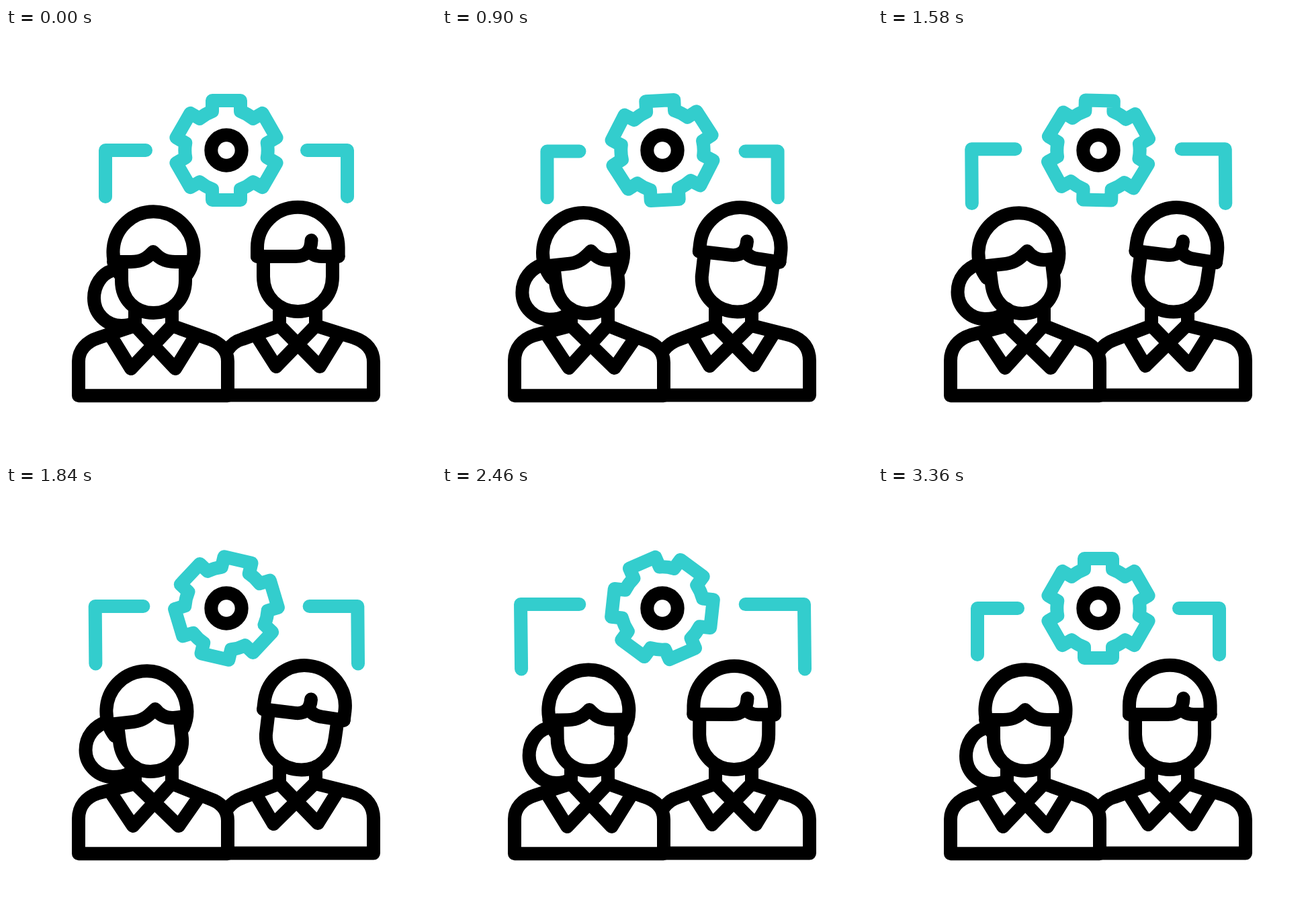
An HTML page that plays this animation: 640x640 px, repeating every 3.6 s.

```html
<!DOCTYPE html>
<html lang="en">
<head>
<meta charset="utf-8">
<title>Team setup</title>
<style>
  html, body { margin: 0; width: 100%; height: 100%; overflow: hidden; background: #fff; }
  svg { display: block; width: 100vw; height: 100vh; }
  path, circle { fill: none; stroke: #000; stroke-width: 20; stroke-linecap: round; stroke-linejoin: round; }
  .teal { stroke: #33cdcd; }
</style>
</head>
<body>
<svg id="stage" viewBox="0 0 640 640">
  <path id="brackets" class="teal"/>
  <path id="gear" class="teal"/>
  <circle cx="328" cy="182" r="22.7"/>
</svg>
<script>
const LOOP = 3600;
const svg = document.getElementById('stage');
const gear = document.getElementById('gear');
const brackets = document.getElementById('brackets');

const linear = u => u;
const smooth = u => u * u * (3 - 2 * u);
const sine = u => (1 - Math.cos(u * Math.PI)) / 2;
const soft = u => (u + smooth(u)) / 2;
const lerp = (a, b, k) => a + (b - a) * k;

// Each step: [time, value, easing towards this value]
function track(steps, t) {
  if (t <= steps[0][0]) return steps[0][1];
  for (let i = 1; i < steps.length; i++) {
    const [t1, b, ease] = steps[i];
    if (t < t1) {
      const [t0, a] = steps[i - 1];
      const k = ease((t - t0) / (t1 - t0));
      return Array.isArray(a) ? a.map((v, j) => lerp(v, b[j], k)) : lerp(a, b, k);
    }
  }
  return steps[steps.length - 1][1];
}

// Blend two path strings that share one structure
function blend(from, to, k) {
  const ends = to.match(/[\d.]+/g);
  let i = 0;
  return from.replace(/[\d.]+/g, n => +lerp(+n, +ends[i++], k).toFixed(2));
}

const spin = [[60, 0], [3160, -368, sine], [3360, -360, smooth]];
const leftTilt = [[80, 0], [1060, 1, smooth], [1840, 1, linear], [2620, 0, smooth]];
const rightTilt = [[80, 0], [1060, 1, smooth], [1750, 1, linear], [2560, 0, smooth]];

// Tip x, corner x, corner y, bottom y, sideways lean of the foot
const frame = [
  [80, [208, 148, 182, 251, 0]],
  [680, [204.5, 162, 184.5, 249.5, 0], smooth],
  [2700, [204.3, 111, 175, 275.5, 1.2], linear],
  [3340, [208, 148, 182, 251, 0], soft]
];

// [tilt track, upright pose, tilted pose]
const parts = [
  // left: body, ponytail, hair, fringe, face, collar
  [leftTilt,
    'M192 418L192 443L138 461C119 467 108 480 108 496L108 547.2L330 547.2L330 496C330 480 319 468 300 462L247 443L247 418',
    'M192 418L192 443L138 457C119 463 108 477 108 495L108 547.2L330 547.2L330 498C330 482 320 471 302 465L247 443L247 418'],
  [leftTilt,
    'M158 361C142 366 131 383 131 402C131 425 149 443 172 443C180 443 187 441 192 438',
    'M150 351C132 357 118.5 372 118.5 393C118.5 415 137 433 159 433C168 433 178 431 184 427'],
  [leftTilt,
    'M172 370A60 60 0 1 1 267 370',
    'M162 372A60 60 0 1 1 264 360'],
  [leftTilt,
    'M160 348L186 348C205 348 212 340 219 333C226 340 233 348 252 348L278 348',
    'M154 355L190 351C206 349 214 340 222 332C229 341 238 346 250 345L266 343'],
  [leftTilt,
    'M172 348L172 376C172 404 192 424 219.5 424C247 424 267 404 267 376L267 348',
    'M166 356L169 380C172 408 191 425 215 425C243 425 264 402 262 376L259 350'],
  [leftTilt,
    'M157 460L186 507L247 443M192 443L252 507L281 460',
    'M157 458L189 506L248 441M192 443L257 506L287 463'],
  // right: body, hair, fringe, lock, face, collar
  [rightTilt,
    'M407 418L407 443L352 463Q338 467 330 479M461 418L461 443L518 461C538 468 547 481 547 497L547 546.6L330 546.6',
    'M407 418L407 443L352 464Q338 469 330 480M461 418L461 443L518 457C538 463 547 477 547 495L547 546.6L330 546.6'],
  [rightTilt,
    'M374 340L374 327A60.3 60.3 0 0 1 494.6 327L494.6 340',
    'M383.5 332L385 320A60.3 60.3 0 0 1 504.8 335L503 349'],
  [rightTilt,
    'M374 340L431 340C446 340 454 332 454.5 316',
    'M383.5 332L432 338C446 339 453 331 454 317.5'],
  [rightTilt,
    'M452 331C455 337 461 340 470 340L494.6 340',
    'M451 332C455 339 462 343 472 344L503 349'],
  [rightTilt,
    'M383 340L383 370C383 400 406 422 434.5 422C463 422 486 400 486 370L486 340',
    'M391 337L387 370C386 401 411 422.5 440 422.5C467 422.5 487 403 490 375L494 348'],
  [rightTilt,
    'M374 460L402 504L461 443M407 443L467 504L494 460',
    'M372 459L398 503L461 441M407 443L464 502L492 457']
].map(([tilt, from, to]) => {
  const el = svg.appendChild(document.createElementNS(svg.namespaceURI, 'path'));
  return { el, tilt, from, to };
});

function gearPath() {
  const tooth = [[-21, -58], [-21, -74], [21, -74], [21, -58]];
  let d = '';
  for (let i = 0; i < 6; i++) {
    const c = Math.cos(i * Math.PI / 3), s = Math.sin(i * Math.PI / 3);
    tooth.forEach(([x, y], j) => {
      const cmd = j ? 'L' : i ? 'A62 62 0 0 1 ' : 'M';
      d += `${cmd}${(328 + x * c - y * s).toFixed(2)} ${(182 + x * s + y * c).toFixed(2)}`;
    });
  }
  return d + 'A62 62 0 0 1 307 124Z';
}
gear.setAttribute('d', gearPath());

function draw(t) {
  gear.setAttribute('transform', `rotate(${track(spin, t)} 328 182)`);
  const [tip, x, y, low, lean] = track(frame, t);
  brackets.setAttribute('d',
    `M${tip} ${y}H${x}L${x + lean} ${low}M${656 - tip} ${y}H${656 - x}L${656 - x + lean} ${low}`);
  for (const { el, tilt, from, to } of parts) {
    el.setAttribute('d', blend(from, to, track(tilt, t)));
  }
}

const start = performance.now();
function tick() {
  draw((performance.now() - start) % LOOP);
  requestAnimationFrame(tick);
}
tick();
</script>
</body>
</html>
```
